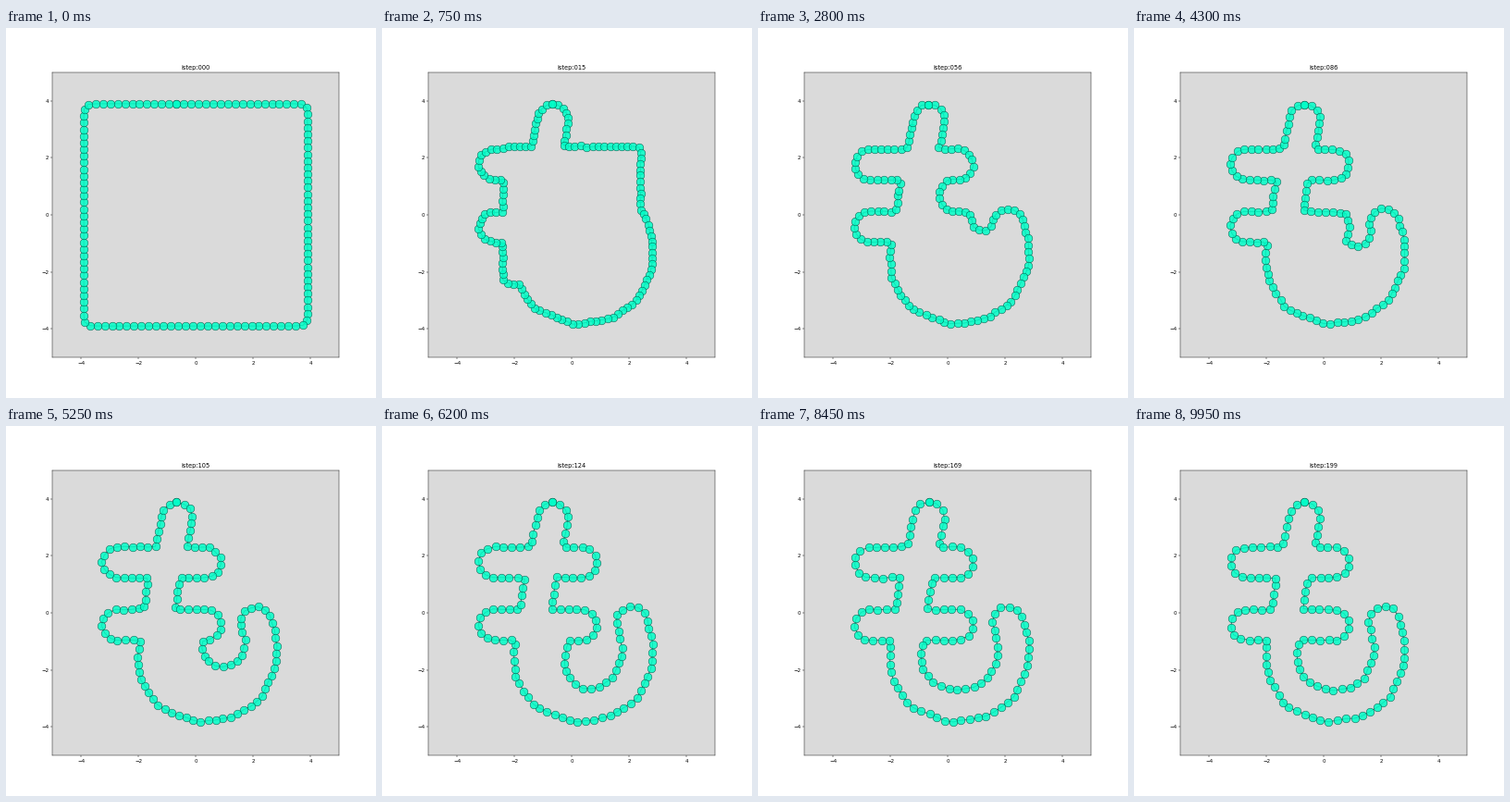
A matplotlib script for the animation above (10 s loop, 400x400 px).

```python
import numpy as np
import matplotlib.pyplot as plt
from matplotlib.animation import FuncAnimation

STEPS = 200
BEADS = 126
STROKE = 0.54      # half the width of a brush stroke
APEX = (-0.66, 3.9)

axis = np.linspace(-4.2, 4.2, 170)
X, Y = np.meshgrid(axis, axis)


def segment(a, b):
    """Distance from every grid point to the segment a-b."""
    dx, dy = b[0] - a[0], b[1] - a[1]
    t = ((X - a[0]) * dx + (Y - a[1]) * dy) / (dx * dx + dy * dy + 1e-9)
    t = np.clip(t, 0, 1)
    return np.hypot(X - a[0] - t * dx, Y - a[1] - t * dy)


def disc(x, y, r):
    return np.hypot(X - x, Y - y) - r


def stroke(points):
    return np.min([segment(a, b) for a, b in zip(points, points[1:])], axis=0) - STROKE


BARS = [stroke([(-2.71, y), (0.35, y)]) for y in (1.77, -0.42)]
HOOK = stroke([(-0.66, 3.35), (-1.16, 0.85), (-1.48, -1.45), (-1.42, -2.1),
               (-0.95, -2.85), (0.15, -3.29), (1.15, -3.13), (1.84, -2.66),
               (2.26, -1.75), (2.29, -1.1), (2.1, -0.32)])
GLYPH = np.minimum(np.minimum(*BARS), HOOK)

# The two bays on the right are still plugged when the contour first arrives.
POCKETS = np.minimum(disc(0.06, 0.68, 0.87), disc(0.68, -1.33, 1.68))
SQUARE = (np.abs(X) ** 40 + np.abs(Y) ** 40) ** (1 / 40)


def bay_fronts(step):
    """Negative where the contour has already pushed into the bays."""
    upper_x = np.interp(step, [32, 56, 90], [1.55, 0.29, -0.6])
    upper = segment((1.55, 0.68), (upper_x, 0.68)) - 0.6
    times = [32, 56, 86, 124, 150]
    tip = (np.interp(step, times, [1.32, 1.19, 1.16, 0.74, 0.35]),
           np.interp(step, times, [0.4, -0.1, -0.62, -1.69, -1.75]))
    radius = np.interp(step, times, [0.1, 0.45, 0.47, 1.0, 2.0])
    lower = segment((1.32, 0.4), tip) - radius
    return np.minimum(upper, lower)


def contour(step):
    """Outer boundary at a step: closed, clockwise, starting at the apex."""
    square = SQUARE - (3.9 - 0.1 * step)
    plug = np.maximum(POCKETS, -bay_fronts(step))
    field = np.minimum(np.minimum(GLYPH, square), plug)
    lines = ax.contour(X, Y, field, levels=[0])
    p = max(lines.allsegs[0], key=len)[:-1]
    lines.remove()
    x, y = p.T
    if np.sum(x * np.roll(y, -1) - y * np.roll(x, -1)) > 0:
        p = p[::-1]
    p = np.roll(p, -np.argmin(np.hypot(*(p - APEX).T)), axis=0)
    return np.vstack([p, p[:1]])


def beads(step):
    p = contour(step)
    dx, dy = np.diff(p, axis=0).T
    stretch = 1 + 0.1 * max(0, 1 - step / 20)   # sides start out denser
    s = np.append(0, np.cumsum(np.hypot(dx, stretch * dy)))
    t = np.linspace(0, s[-1], BEADS + 1)
    xy = np.array([np.interp(t, s, p[:, 0]), np.interp(t, s, p[:, 1])])
    if step:
        xy += np.random.default_rng(step).normal(0, 0.012, xy.shape)
        xy[:, -1] = xy[:, 0]
    return xy


fig, ax = plt.subplots(figsize=(10, 10), dpi=40)
ax.set_facecolor("#dadada")
ax.set(xlim=(-5, 5), ylim=(-5, 5), xticks=range(-4, 5, 2), yticks=range(-4, 5, 2))
title = ax.set_title("istep:000")
chain, = ax.plot([], [], "o-", color="#004d40", lw=1.5, ms=15.5, mew=1,
                 mfc="#00ffc8", mec="#004d40", alpha=0.85)


def draw(step):
    chain.set_data(*beads(step))
    title.set_text(f"istep:{step:03d}")
    return chain, title


anim = FuncAnimation(fig, draw, frames=STEPS, interval=50, repeat=True,
                     repeat_delay=0, blit=False)
plt.show()
```
